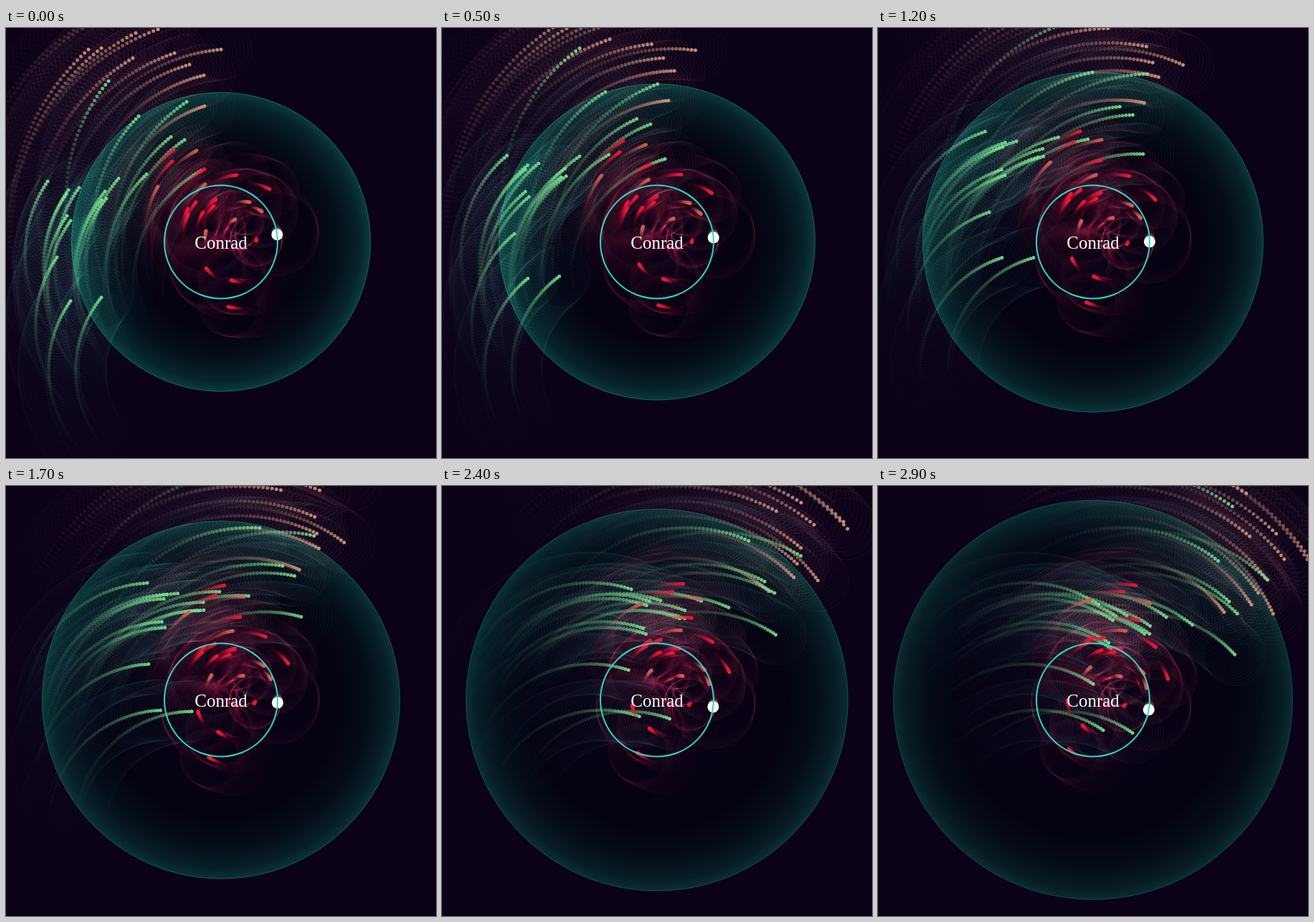
Recreate the animation shown at these times as an HTML page with a canvas. Size 600 by 600 pixels, loop 3 s.

```html
<!DOCTYPE html>
<html lang="en">
<head>
<meta charset="utf-8">
<title>Orbits</title>
<style>
html, body { margin: 0; width: 100%; height: 100%; overflow: hidden; background: #0b0217; }
canvas { display: block; width: 600px; height: 600px; }
</style>
</head>
<body>
<canvas id="stage" width="600" height="600"></canvas>
<script>
const ctx = document.getElementById('stage').getContext('2d');
const TAU = Math.PI * 2, RAD = Math.PI / 180;
const STEPS = 30, STEP_MS = 100;

// Start positions, x y pairs
const GREEN = [58,214, 87,226, 84,232, 90,269, 85,262, 102,223, 71,320, 90,381, 133,376,
  138,228, 157,210, 140,238, 133,240, 196,204, 185,123, 252,103, 230,152, 249,156, 272,199, 143,74];
const PINK = [300,30, 276,66, 256,51, 235,35, 277,109, 177,42, 181,7, 212,2, 115,30, 133,28, 219,-48, 229,-53];
const RED = [277,197, 232,186, 234,170, 322,205, 368,225, 349,297, 265,243, 254,252, 254,260,
  275,257, 290,248, 293,239, 279,335, 314,352, 310,389];
const ROSE = [266,171, 212,221, 357,256, 340,243, 320,267, 278,218, 279,283];

// Travel along a circle, heading from angle a0 and turning w degrees per step
function arcPath(x, y, r, a0, w) {
  const s0 = Math.sin(a0 * RAD), c0 = Math.cos(a0 * RAD);
  return k => {
    const a = (a0 + w * k) * RAD;
    return [x + r * (Math.sin(a) - s0), y - r * (Math.cos(a) - c0)];
  };
}

function greenPath(x, y) {
  const u = x / 252, w = 3.1 - 0.4 * u * u;
  const mid = -11.5 + 17 * u ** 2.5;
  return arcPath(x, y, 160 + 72 * Math.exp((103 - y) / 90), mid - 14.5 * w, w);
}

function pinkPath(x, y) {
  const dx = x - 300, dy = y - 30;
  return arcPath(x, y, 251 - 0.45 * dx - 0.95 * dy, -5 + 0.2 * dx - 0.1 * dy, 2.45);
}

function innerPath(x, y) {
  const dx = x - 331, dy = y - 293;
  const r = Math.hypot(dx, dy), a0 = Math.atan2(dy, dx), w = (1.3 - dy / 320) * RAD;
  return k => [331 + r * Math.cos(a0 + w * k), 293 + r * Math.sin(a0 + w * k)];
}

function group(list, path, dot, ring, ringAlpha, fade, inner) {
  const out = [];
  for (let i = 0; i < list.length; i += 2) {
    const size = inner ? 36 + (i * 7 % 5) * 5 : 43;
    out.push({ at: path(list[i], list[i + 1]), dot, ring, ringAlpha, fade, size });
  }
  return out;
}

const particles = [
  ...group(PINK, pinkPath, '214,152,128', '130,62,66', 0.10, 0.93),
  ...group(GREEN, greenPath, '122,226,146', '34,112,96', 0.10, 0.93),
  ...group(ROSE, innerPath, '205,92,84', '170,30,44', 0.045, 0.88, true),
  ...group(RED, innerPath, '236,24,58', '180,22,42', 0.045, 0.88, true)
];

function disc(x, y, r, fill) {
  ctx.fillStyle = fill;
  ctx.beginPath();
  ctx.arc(x, y, r, 0, TAU);
  ctx.fill();
}

function circle(x, y, r, stroke, width = 1) {
  ctx.strokeStyle = stroke;
  ctx.lineWidth = width;
  ctx.beginPath();
  ctx.arc(x, y, r, 0, TAU);
  ctx.stroke();
}

function drawWave(k) {
  const r = 209 + 2.41 * k, dim = 1 - 0.38 * k / STEPS;
  const g = ctx.createRadialGradient(300, 298.5, 0, 300, 298.5, r);
  const at = px => Math.max(0, 1 - px / r);
  g.addColorStop(0, 'rgba(10,2,22,1)');
  g.addColorStop(at(85), 'rgb(4,2,17)');
  g.addColorStop(at(45), `rgb(5,${8 + 7 * dim},${21 + 5 * dim})`);
  g.addColorStop(at(15), `rgb(7,${14 + 22 * dim},${24 + 18 * dim})`);
  g.addColorStop(1, `rgb(10,${18 + 42 * dim},${28 + 32 * dim})`);
  disc(300, 298.5, r, g);
  circle(300, 298.5, r - 0.5, `rgba(28,128,118,${0.55 * dim})`);
}

function drawRings(p, k) {
  for (let j = 50; j >= 0; j--) {
    const [x, y] = p.at(k - j / 2);
    circle(x, y, p.size, `rgba(${p.ring},${p.ringAlpha * 0.95 ** j})`);
  }
}

function drawTrail(p, k) {
  for (let j = 50; j >= 0; j--) {
    const [x, y] = p.at(k - j / 2);
    disc(x, y, 2.5, `rgba(${p.dot},${0.92 * p.fade ** j})`);
  }
}

function moon(k) {
  const a = (-7.3 + 0.6 * k) * RAD;
  return [300 + 79 * Math.cos(a), 298.5 + 79 * Math.sin(a)];
}

function draw(k) {
  ctx.fillStyle = '#0b0217';
  ctx.fillRect(0, 0, 600, 600);
  drawWave(k);

  ctx.globalCompositeOperation = 'lighter';
  for (const p of particles) drawRings(p, k);
  for (let j = 0; j < 20; j++) circle(...moon(k - j), 58, `rgba(180,22,42,${0.07 * 0.9 ** j})`);
  ctx.globalCompositeOperation = 'source-over';

  for (const p of particles) drawTrail(p, k);

  for (let j = 8; j > 0; j--) disc(...moon(k - j), 7.5, `rgba(255,255,255,${0.3 * 0.7 ** j})`);
  disc(...moon(k), 8, '#fff');
  circle(300, 298.5, 79, '#2fd8c6', 2);

  ctx.fillStyle = '#fff';
  ctx.font = '25px "Liberation Serif", serif';
  ctx.textAlign = 'center';
  ctx.fillText('Conrad', 300, 308);
}

const start = performance.now();
let last = -1;
function tick() {
  const k = Math.floor((performance.now() - start) / STEP_MS) % STEPS;
  if (k !== last) draw(last = k);
  requestAnimationFrame(tick);
}
tick();
</script>
</body>
</html>
```
